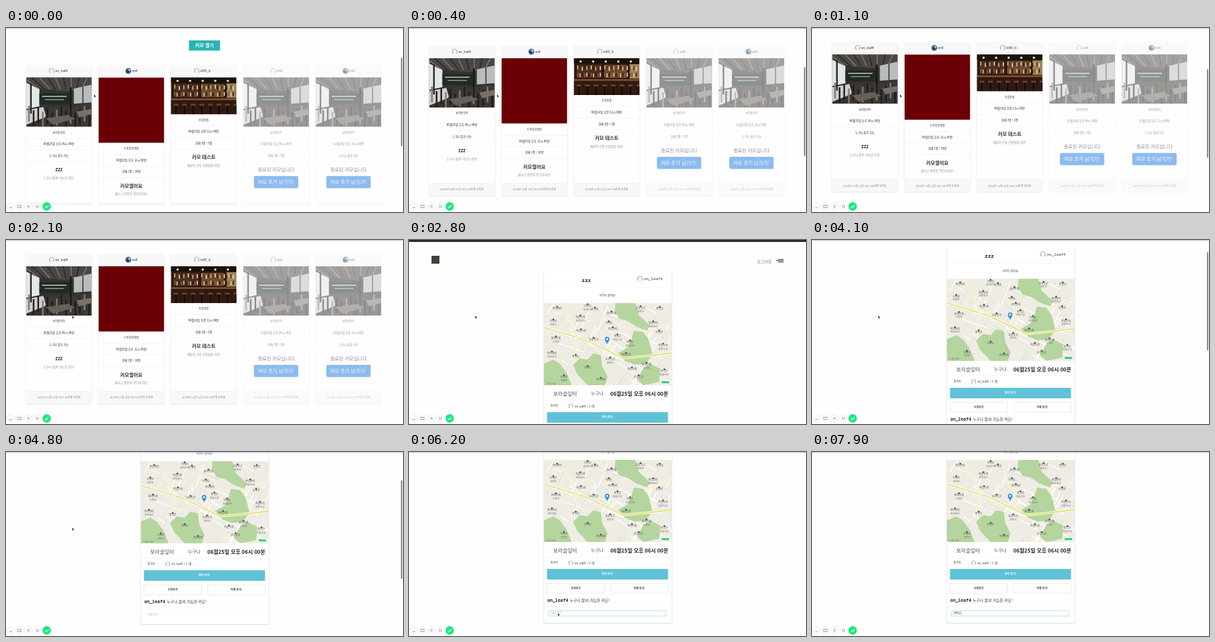
An HTML page that plays this animation: 600x280 px, repeating every 8 s.

```html
<!DOCTYPE html>
<html lang="ko">
<head>
<meta charset="utf-8">
<style>
html, body { margin: 0; width: 100%; height: 100%; overflow: hidden; background: #fefefe; }
svg { display: block; width: 600px; height: 280px; }
svg svg { overflow: hidden; }
text { font-family: 'Noto Sans CJK KR', 'Noto Sans CJK', 'Noto Sans', sans-serif; white-space: pre; }
.m { font-family: 'Noto Sans Mono', 'DejaVu Sans Mono', monospace; }
.b { font-weight: 700; }
.c { text-anchor: middle; }
</style>
</head>
<body>
<svg id="stage" viewBox="0 0 600 280"></svg>
<script>
const LOOP = 8000, SWITCH = 2700;
const USER = 'on_leaf4', PLACE = '보라솔잎터';

const rect = (x, y, w, h, fill, more = '') =>
  `<rect x="${x}" y="${y}" width="${w}" height="${h}" fill="${fill}" ${more}/>`;
const circle = (x, y, r, fill, more = '') =>
  `<circle cx="${x}" cy="${y}" r="${r}" fill="${fill}" ${more}/>`;
const path = (d, fill, stroke = 'none', w = 1) =>
  `<path d="${d}" fill="${fill}" stroke="${stroke}" stroke-width="${w}"/>`;
// y is the middle of the line
const text = (x, y, size, str, fill = '#333', cls = 'c', more = '') =>
  `<text x="${x}" y="${y + size * .36}" font-size="${size}" fill="${fill}" class="${cls}" ${more}>${str}</text>`;
const line = (x, y, w, color = '#f0f0f0') => rect(x, y, w, .6, color);
const boxed = (x, y, w, h, art) =>
  `<svg x="${x}" y="${y}" width="${w}" height="${h}" viewBox="0 0 ${w} ${h}">${art}</svg>`;

function avatar(x, y, r, blue) {
  if (blue) return circle(x, y, r, '#4a7296') + circle(x - 1, y + 1, r * .5, '#1f3d5a') + circle(x + 1.5, y - 1.5, r * .35, '#b5cde0');
  return circle(x, y, r, '#c4c4c4') + circle(x, y - r * .12, r * .55, '#fff') +
    path(`M${x - r * .7} ${y + r * .72}q${r * .7} ${-r * .75} ${r * 1.4} 0q${-r * .7} ${r * .5} ${-r * 1.4} 0z`, '#fff');
}

// Photos, 99 wide
function terrace() {
  let s = rect(0, 0, 99, 75, '#35322f') + path('M0 0H99V16L60 21 22 17 0 6z', '#4a4743');
  for (let i = 0; i < 9; i++) s += path(`M${i * 12 - 4} 0L${20 + i * 8} 18`, 'none', i % 2 ? '#23211e' : '#85827d', 1.2);
  s += path('M0 8L20 18V44L0 48z', '#e3e6e7') + path('M72 17L99 11V38L72 40z', '#b9bcbc') +
    path('M0 50L26 45 30 60 0 72z', '#cfcfcd') + path('M34 44H70L99 40V75H24z', '#3b3733') +
    rect(20, 24, 46, 17, '#202b27') + rect(24, 28, 37, 1.6, '#b9c0b4') + rect(28, 33, 29, 1.4, '#949d91');
  for (let i = 0; i < 14; i++) s += rect(3 + i * 7, 43 + i * 7 % 12, 2.4, 24, i % 3 ? '#1f1d1b' : '#827c74');
  s += path('M30 62L64 57 74 63 40 72z', '#66605a') + path('M76 52L99 48V56L80 61z', '#77716a');
  return s + rect(6, 9, 2.4, 46, '#262421') + rect(66, 15, 2.6, 45, '#1c1a18') + rect(85, 14, 1.6, 30, '#3a3733');
}
function bar() {
  let s = rect(0, 0, 99, 56, '#2b1a13') + rect(0, 0, 99, 8, '#19120f') + rect(4, 10, 38, 20, '#4b2f1f') +
    rect(46, 10, 34, 20, '#6f4c30') + rect(84, 9, 15, 22, '#a08458');
  for (let i = 0; i < 27; i++) {
    s += rect(5 + i * 3.4, 11 + i % 3, 1.6, 6, ['#d6b683', '#5d3421', '#ece0c4', '#2b1b13'][i % 4]);
    s += rect(5 + i * 3.4, 22 + i % 2, 1.7, 6, ['#8f5c31', '#dcc59a', '#2f1b11'][i % 3]);
  }
  for (let x = 10; x < 99; x += 19) s += circle(x, 5, 1.7, '#ffe7ab');
  s += rect(0, 32, 99, 2.5, '#8d5732') + rect(0, 34.5, 99, 22, '#2f1a12');
  for (let x = 4; x < 99; x += 13) s += rect(x, 40, 7, 3, '#6b4028') + rect(x + 2.5, 43, 2, 13, '#100b09');
  return s;
}

const photos = [[75, terrace()], [99.5, rect(0, 0, 99, 99.5, '#6a0005')], [56, bar()]];

function card(i, c) {
  const x = 30 + i * 109.4, mid = x + 50, [h, art] = photos[c.photo], y = 75.5 + h;
  let s = rect(x - .4, 57, 100.8, 228.4, '#e4e4e4', 'rx="2"') + rect(x, 56.5, 100, 228, '#fefefe', 'rx="2"') +
    rect(x, 56.5, 100, 19, '#f8f8f8', 'rx="2"') + avatar(mid + c.dx, 65.5, 4.5, c.blue) +
    text(mid + c.dx + 5.5, 65.5, 4.7, c.user, '#222', '') + boxed(x + .5, 75.5, 99, h, art) +
    text(mid, y + 9, 4.1, c.place) + line(x, y + 17.5, 100) +
    text(mid, y + 26.5, 4.3, c.date, '#222') + line(x, y + 35, 100) +
    text(mid, y + 44, 4.2, c.who, '#222') + line(x, y + 52.5, 100);
  if (c.done) s += text(mid, y + 65, 7.2, '종료된 커모입니다', '#222') +
    rect(mid - 33.5, y + 75, 67, 18.5, '#1f7ae0', 'rx="2"') + text(mid - .5, y + 84.2, 7.4, '커모 후기 남기기!', '#fff');
  else s += text(mid, y + 65.5, 7.3, c.title, '#333', 'c b') + text(mid, y + 78, 4.5, c.desc, '#8b8b8b');
  s += rect(x, 266, 100, 18.5, '#f8f8f8') + line(x, 266, 100, '#eaeaea') +
    text(mid, 275.5, 4, c.made + ' 06시 00분에 등록됨', '#858585');
  return `<g opacity="${c.done ? .5 : 1}">${s}</g>`;
}

const cards = [
  { photo: 0, dx: -11, user: USER, place: PLACE, date: '06월25일 오후 06시 00분', who: '누구나 참가 가능',
    title: 'zzz', desc: '누구나 참여 가능한 커모!', made: '2018년 12월 25일' },
  { photo: 1, dx: -4.5, user: 'on4', blue: 1, place: '누리달모래집', date: '06월23일 오후 12시 00분', who: '현재 1명 / 10명',
    title: '커모열어요', desc: '끝나고 천천히 먹으러가요!', made: '2018년 12월 23일' },
  { photo: 2, dx: -10.5, user: 'left5_b', place: '은결찻집', date: '06월16일 오전 12시 00분', who: '현재 1명 / 2명',
    title: '커모 테스트', desc: '혜화역 근처 은결찻집 커모!', made: '2018년 12월 12일' },
  { photo: 0, dx: -4.5, user: 'on4', place: PLACE, date: '11월15일 오후 05시 20분', who: '현재 2명 / 2명', done: 1, made: '2018년 11월 15일' },
  { photo: 0, dx: -4.5, user: 'on4', blue: 1, place: PLACE, date: '11월12일 오후 12시 00분', who: '누구나 참가 가능', done: 1, made: '2018년 11월 12일' }
];

function map() {
  let seed = 7;
  const rnd = () => (seed = seed * 16807 % 2147483647) / 2147483647;
  let s = rect(0, 0, 193, 125, '#efece4');
  for (let i = 0; i < 75; i++) {
    const x = rnd() * 193, y = rnd() * 125, a = (i % 2 ? .35 : 1.9) + rnd() * .3, l = 14 + rnd() * 28;
    s += path(`M${x} ${y}l${Math.cos(a) * l} ${Math.sin(a) * l}`, 'none', i % 3 ? '#fff' : '#dcd8ce', i % 3 ? 1.3 : .7);
  }
  for (const d of [
    'M108 0H138L143 18 160 34 156 42 140 36 128 28 114 24 107 12z',
    'M136 42L150 44 158 55 164 78 154 92 138 94 122 88 112 76 126 68 132 55z',
    'M0 92L14 86 24 92 34 106 42 125H0z',
    'M44 94L54 84 66 86 74 77 86 79 88 96 96 112 92 125H66L50 108z',
    'M150 100L160 92 176 100 174 120 150 125 140 116z'
  ]) s += path(d, '#b5d59e');
  for (const d of ['M0 37L30 46 62 56 96 72 120 84 160 80 193 76', 'M83 0L92 26 104 47 100 72', 'M193 30L168 40 152 46', 'M22 0L40 28 50 53 44 88'])
    s += path(d, 'none', '#fff', 3.4) + path(d, 'none', d[1] == '0' ? '#dfe36b' : '#eee9b8', 1.8);
  const spots = [[20, 9], [66, 5], [77, 10], [55, 22], [102, 16], [146, 8], [175, 9], [165, 31], [98, 31], [14, 28],
    [56, 43], [18, 54], [75, 56], [111, 51], [104, 40], [130, 60], [174, 45], [180, 65], [124, 79], [100, 86],
    [48, 82], [12, 77], [66, 99], [30, 113], [133, 101], [155, 94], [143, 113], [182, 104], [86, 117]];
  const words = ['주민센터', '초등학교', '마을시장', '아파트', '중학교', '동네공원', '우체국'];
  spots.forEach(([x, y], i) => {
    s += rect(x - 1.3, y - 4.6, 2.6, 2.6, '#555', 'rx=".6"') + text(x, y, 4, words[i * 3 % 7], '#555');
    if (i % 2) s += text(x, y + 4.2, 3.7, words[i * 5 % 7], '#666');
  });
  return s + rect(178, 119, 11, 3, '#2fd37a') + text(3, 122.5, 3, '© 지도 자료', '#666', '') +
    path('M95.5 63C93 58 91.7 57 91.7 54.8a3.8 3.8 0 0 1 7.6 0C99.3 57 98 58 95.5 63z', '#2d8fd5', '#fff', .5) +
    circle(95.5, 54.8, 1.6, '#fff');
}

const listPage = rect(276.5, 19, 47, 15.5, '#29b3b3') + text(300, 26.7, 7.2, '커모 열기', '#fff', 'c b') +
  cards.map((c, i) => card(i, c)).join('');

const outlined = x => rect(x, 284.5, 87, 14.5, '#fff', 'stroke="#e2e2e2" stroke-width=".7"');
const detailPage = rect(34, 24, 12, 12, '#4a4038') + text(537, 33, 6, '로그아웃', '#777') +
  rect(558, 29, 8, 1, '#333') + rect(555, 31, 11, 1, '#333') + rect(558, 33, 8, 1, '#333') +
  rect(203, 47, 194.6, 298, '#dedede', 'rx="2"') + rect(203.6, 46, 193.4, 298, '#fff', 'rx="2"') +
  text(268, 61, 7.8, 'zzz', '#222', 'c m b') + avatar(349, 59, 4.6) + text(355, 59.3, 5.9, USER, '#333', 'm') +
  line(204, 72.5, 193) + text(300, 84.5, 4, '사진이 없어요!') + boxed(204, 96, 193, 125, map()) +
  text(236, 234, 7.8, PLACE, '#555') + text(284.5, 234, 6.9, '누구나', '#555') +
  text(348, 234, 7.9, '06월25일 오후 06시 00분', '#222', 'c b') + line(204, 243.5, 193) +
  text(214, 253, 4, '참가자', '#333', '') + avatar(244.5, 253, 3.8) + text(250, 253, 4.2, USER + ', ( 1 )명', '#333', '') +
  rect(208.5, 262, 183, 16, '#5fc2d6') + text(300, 270, 4, '참여 하기!', '#fff', 'c b') +
  outlined(208.5) + outlined(305) + text(252, 292, 4, '수정하기', '#333', 'c b') + text(348, 292, 4, '삭제 하기!', '#333', 'c b') +
  text(209, 310, 6.6, USER, '#222', 'm b') + text(243, 310, 5.8, '누구나 참여 가능한 커모!', '#333', '') +
  line(204, 319.5, 193, '#f3f3f3') +
  rect(211, 325.8, 177, 8, '#fff', 'id="field" stroke="#9fd0e4" stroke-width=".7"') +
  text(214, 330, 4, '', '#aaa', '', 'id="note"');

const ring = x => circle(x, 271.5, 5.6, '#fff', 'stroke="#e4e4e4" stroke-width=".8"');
const tools = [7, 20.5, 34, 47.5].map(ring).join('') + rect(4.5, 273, 5, .9, '#999') +
  rect(17.8, 269.7, 5, 3.6, 'none', 'stroke="#888" stroke-width=".8"') +
  path('M32 269.5l4 4m0-4l-4 4M46.4 269.3v4.4m2.4-4.4v4.4', 'none', '#888', .9) +
  circle(61.5, 271.5, 6.4, '#1bea7b') + path('M58.8 271.6l2 2 3.5-4', 'none', '#fff', 1.2);

document.getElementById('stage').innerHTML = `<clipPath id="view">${rect(0, 9, 600, 261, '#000')}</clipPath>` +
  rect(0, 0, 600, 280, '#fefefe') +
  `<g clip-path="url(#view)"><g id="list">${listPage}</g></g><g id="detail">${detailPage}</g>` +
  rect(0, 0, 600, 1, '#c4c4c4', 'id="edge"') + rect(596.8, 0, 2.2, 135, '#8c8c8c', 'id="thumb" rx="1.1"') + tools +
  `<g id="pointer">${path('M0 0V4.4L1.1 3.5 1.9 5.1 2.6 4.7 1.9 3.2H3.2z', '#111', '#fff', .35)}</g>`;

const $ = id => document.getElementById(id);
const set = (id, attrs) => { for (const k in attrs) $(id).setAttribute(k, attrs[k]); };
const clamp = v => Math.max(0, Math.min(1, v));
const ease = (t, a, b) => { const p = clamp((t - a) / (b - a)); return p * p * (3 - 2 * p); };
function along(t, keys) {
  let v = keys[0][1];
  for (let i = 1; i < keys.length; i++) {
    const [a, from] = keys[i - 1], [b, to] = keys[i];
    v += (to - from) * clamp((t - a) / (b - a));
  }
  return v;
}

const typed = ['', 'ㅈ', '재', '잼', '재미', '재밍', '재미이', '재미있'];

function draw(t) {
  const first = t < SWITCH;
  // The button leaves with the first scroll step
  const listY = 35.5 * (1 - Math.exp(-t / 226));
  const detailY = along(t, [[3500, 0], [3700, 5], [4100, 37], [4500, 70], [4800, 82], [5300, 84]]);
  set('list', { transform: `translate(0 ${-listY})`, display: first ? '' : 'none' });
  set('detail', { transform: `translate(0 ${-detailY})`, display: first ? 'none' : '' });

  const dark = !first && t < 3600;
  set('edge', { height: dark ? 3 : 1, fill: dark ? '#2c292b' : '#c4c4c4' });
  set('thumb', {
    y: first ? 45 + listY * .5 : detailY * .55 - 2,
    height: first ? 135 : 150,
    opacity: first ? 1 - ease(t, 1300, 1700) : t < 3600 ? 0 : 1 - ease(t, 5400, 5800)
  });

  const hop = ease(t, 1850, 2100), dive = ease(t, 5400, 6200);
  set('pointer', {
    transform: `translate(${133 - 33 * hop + 125 * dive} ${101 + 14 * hop + 130 * dive})`,
    display: t < 6300 ? '' : 'none'
  });

  const focus = t >= 6200;
  const n = Math.max(0, Math.min(7, Math.floor((t - 6200) / 200)));
  set('field', { display: focus ? '' : 'none' });
  set('note', { fill: n ? '#333' : '#aaa' });
  $('note').textContent = n ? typed[n] + '|' : (focus ? '|' : '') + '댓글 달기 ...';
}

function tick() {
  draw(performance.now() % LOOP);
  requestAnimationFrame(tick);
}
tick();
</script>
</body>
</html>
```
